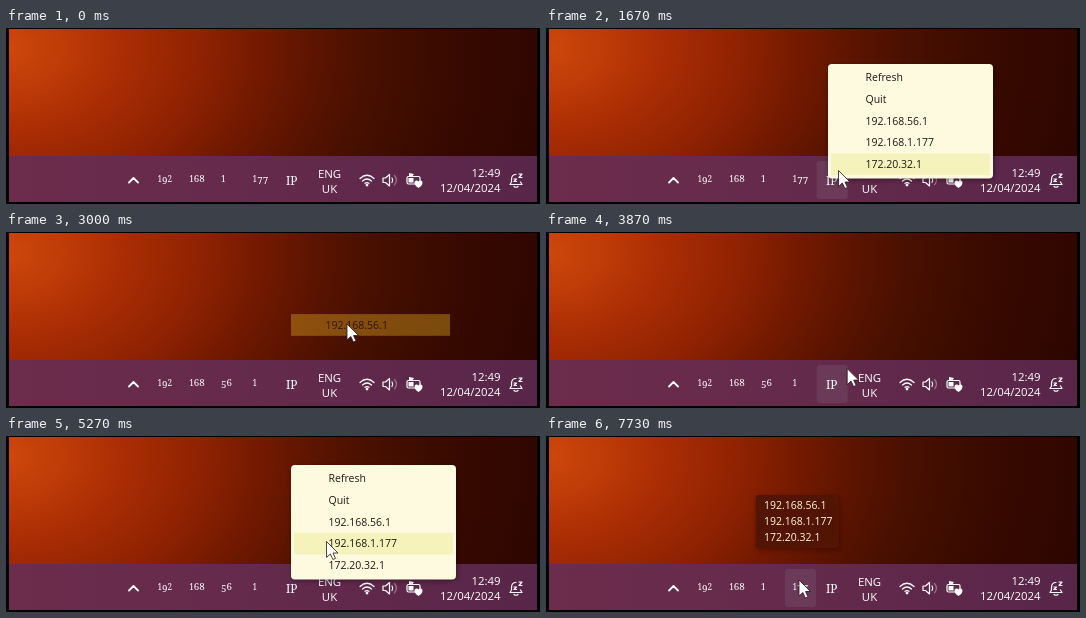
Recreate the animation shown at these times as an HTML page. Size 534 by 176 pixels, loop 8 s.

```html
<!DOCTYPE html>
<html lang="en">
<head>
<meta charset="utf-8">
<title>Tray address menu</title>
<style>
  html, body { margin: 0; width: 100%; height: 100%; overflow: hidden; background: #000; }
  svg { display: block; width: 100%; height: 100%; }
  text { font-family: "Open Sans", "Noto Sans", sans-serif; white-space: pre; }
  .clock { font-size: 11.4px; font-weight: 500; fill: #fff; }
  .serif, .serif tspan { font-family: "Noto Serif", "Liberation Serif", serif; fill: #fff; }
  .item { font-size: 10.5px; fill: #1c1a14; }
  .tip { font-size: 10.5px; font-weight: 500; fill: #fff8dc; }
  .line { fill: none; stroke: #fff; stroke-width: 1.2; stroke-linecap: round; stroke-linejoin: round; }
</style>
</head>
<body>
<svg viewBox="0 0 534 176">
  <defs>
    <radialGradient id="glow" gradientUnits="userSpaceOnUse" cx="0" cy="0" r="560"
      gradientTransform="translate(0 20) scale(1 .72)">
      <stop offset="0" stop-color="#cc480c"/>
      <stop offset=".1" stop-color="#c03c08"/>
      <stop offset=".2" stop-color="#ac2e04"/>
      <stop offset=".35" stop-color="#8e2202"/>
      <stop offset=".45" stop-color="#741a00"/>
      <stop offset=".55" stop-color="#5c1400"/>
      <stop offset=".65" stop-color="#481000"/>
      <stop offset=".8" stop-color="#380a00"/>
      <stop offset="1" stop-color="#2c0500"/>
    </radialGradient>
    <linearGradient id="bar">
      <stop offset="0" stop-color="#6c2c4c"/>
      <stop offset=".5" stop-color="#642a4c"/>
      <stop offset="1" stop-color="#582649"/>
    </linearGradient>
    <filter id="soft" x="-20%" y="-20%" width="140%" height="140%">
      <feGaussianBlur stdDeviation="2.5"/>
    </filter>
  </defs>

  <rect width="534" height="176"/>
  <rect x="3" y="1" width="528" height="128" fill="url(#glow)"/>
  <rect x="3" y="128" width="528" height="46" fill="url(#bar)"/>

  <rect id="slot" y="133" width="31" height="38" rx="3" fill="#6a3a58"/>
  <path class="line" style="stroke-width:1.8" d="M123 154.5l4.5-4.5 4.5 4.5"/>
  <g id="digits"></g>
  <text class="serif" x="280" y="156.500" font-size="11.8">IP</text>
  <text class="clock" x="323.500" y="150" text-anchor="middle">ENG</text>
  <text class="clock" x="323.500" y="165" text-anchor="middle">UK</text>

  <path class="line" d="M354 150.500q7-6.500 14 0M356.500 153q4.500-4 9 0M359 155.300q2-1.600 4 0"/>
  <circle cx="361" cy="157" r="1.400" fill="#fff"/>
  <path class="line" d="M377 150h2.500l4-3.500v11.500l-4-3.500H377z"/>
  <path class="line" d="M386 150q1.600 2.200 0 4.500"/>
  <path class="line" style="stroke:#a0708c" d="M388.500 147.500q4 4.700 0 9.300"/>
  <rect class="line" x="401" y="148.500" width="13" height="7.500" rx="1.500"/>
  <path fill="#fff" d="M402.500 150h5v4.500h-5zM403 145l5 1-2 3h-3zM408.500 154.500q0-2 2-2 1.500 0 2 1 .5-1 2-1 2 0 2 2 0 3-4 5.500-4-2.500-4-5.500z"/>
  <text class="clock" x="494.500" y="148.500" text-anchor="end">12:49</text>
  <text class="clock" x="494.500" y="164" text-anchor="end">12/04/2024</text>
  <path class="line" d="M510 146.500q-4.500 0-4.500 5v2.500l-1.500 2.500h12l-1.500-2.500M508 158.500q2 1.500 4 0M513 146h3l-3 3.500h3M508 151h2.500l-2.500 2.500h2.500"/>

  <g id="tooltip">
    <rect x="210" y="61" width="84" height="53" rx="3" fill="#200600" opacity=".4" filter="url(#soft)"/>
    <rect x="210" y="59" width="83" height="53" rx="3" fill="#521504"/>
  </g>
  <g id="menu">
    <rect x="1" y="2" width="165" height="114" rx="5" opacity=".4" filter="url(#soft)"/>
    <rect width="165" height="114.500" rx="4" fill="#fdfae0"/>
    <rect id="hover" x="3" width="159" height="21.700" fill="#f6f2bb"/>
  </g>
  <g id="picked">
    <rect width="159" height="21.700" fill="#d8a420" opacity=".82"/>
    <text class="item" x="34.500" y="14.600"></text>
  </g>
  <path id="cursor" d="M0 0V16L3.800 12.500 6.400 18 9 16.900 6.500 11.500H11.500Z" fill="#fff" stroke="#2a1414" stroke-width=".8"/>
</svg>
<script>
const el = id => document.getElementById(id);
const LOOP = 8000, TICK = 1000 / 15, ROW = 21.7, PAD = 2.7;
const SLOT_X = 239, SLOT_W = 31.7;
const ADDRESSES = ['192.168.56.1', '192.168.1.177', '172.20.32.1'];
const ITEMS = ['Refresh', 'Quit', ...ADDRESSES];

// Times below are in ticks of 1/15 second.
const PATH = [
  [7, 308, -20], [10, 304, 28], [13, 286, 95], [16, 277, 146], [18, 287, 161], [20, 282, 151],
  [23, 282, 151], [27, 303, 134], [32, 335, 102], [33, 336, 100], [36, 340, 94],
  [38, 340, 94], [40, 341, 92], [49, 341, 92], [50, 341, 93], [51, 341, 93],
  [55, 321, 115], [60, 288, 151], [64, 281, 155], [66, 286, 143],
  [70, 286, 143], [74, 307, 118], [77, 322, 104], [78, 322, 104], [80, 319, 107],
  [93, 319, 107], [97, 290, 126], [102, 256, 143], [103, 252, 145], [105, 252, 145],
  [106, 253, 145], [108, 253, 145], [109, 253, 144], [120, 253, 144]
];
const MENUS = [
  { x: 282, y: 36, open: 21, close: 43, item: 2 },
  { x: 285, y: 29, open: 69, close: 90, item: 3 }
];
const TRAY = [[0, ADDRESSES[1]], [44, ADDRESSES[0]], [91, ADDRESSES[1]]];

const clamp = v => Math.max(0, Math.min(1, v));
const show = (node, opacity) => {
  node.style.display = opacity > 0 ? '' : 'none';
  node.style.opacity = opacity;
};
const move = (node, x, y) => node.setAttribute('transform', `translate(${x} ${y})`);

function addText(parent, cls, x, y, value) {
  const node = document.createElementNS('http://www.w3.org/2000/svg', 'text');
  node.setAttribute('class', cls);
  node.setAttribute('x', x);
  node.setAttribute('y', y);
  node.textContent = value;
  parent.append(node);
  return node;
}

// Old-style figures: 0-2 are short, 6 and 8 rise, the rest descend.
function oldStyle(number) {
  return [...number].map(d => {
    const size = '012'.includes(d) ? 8.2 : 9.8;
    const y = '34579'.includes(d) ? 156 : 154;
    return `<tspan y="${y}" font-size="${size}">${d}</tspan>`;
  }).join('');
}

ITEMS.forEach((label, i) => addText(el('menu'), 'item', 37.5, PAD + ROW * i + 14.6, label));
ADDRESSES.forEach((label, i) => addText(el('tooltip'), 'tip', 218, 73 + 15.8 * i, label));
const digits = [0, 1, 2, 3].map(i => addText(el('digits'), 'serif', 151.5 + SLOT_W * i, 154, ''));
const pickedText = el('picked').querySelector('text');
let trayAddress = '';

function cursorAt(tick) {
  if (tick <= PATH[0][0]) return PATH[0].slice(1);
  const i = PATH.findIndex(p => p[0] >= tick);
  const [t0, x0, y0] = PATH[i - 1], [t1, x1, y1] = PATH[i];
  const k = (tick - t0) / (t1 - t0);
  return [x0 + (x1 - x0) * k, y0 + (y1 - y0) * k];
}

function draw(tick) {
  const [x, y] = cursorAt(tick);
  move(el('cursor'), x, y);

  const slot = Math.floor((x - SLOT_X) / SLOT_W);
  const onSlot = y > 133 && y < 171 && (slot === 0 || slot === 1);
  show(el('slot'), onSlot ? 1 : 0);
  el('slot').setAttribute('x', SLOT_X + SLOT_W * slot);

  const address = TRAY.filter(([t]) => t <= tick).pop()[1];
  if (address !== trayAddress) {
    trayAddress = address;
    address.split('.').forEach((part, i) => { digits[i].innerHTML = oldStyle(part); });
  }

  const menu = MENUS.find(m => tick >= m.open && tick < m.close);
  show(el('menu'), menu ? clamp(0.5 + (tick - menu.open) * 0.3) : 0);
  if (menu) {
    move(el('menu'), menu.x, menu.y);
    const row = Math.floor((y - menu.y - PAD) / ROW);
    show(el('hover'), row >= 0 && row < ITEMS.length && x > menu.x + 3 ? 1 : 0);
    el('hover').setAttribute('y', PAD + ROW * row);
  }

  const chosen = MENUS.find(m => tick >= m.close && tick < m.close + 4);
  show(el('picked'), chosen ? 0.95 - (tick - chosen.close) * 0.22 : 0);
  if (chosen) {
    move(el('picked'), chosen.x + 3, chosen.y + PAD + ROW * chosen.item);
    pickedText.textContent = ITEMS[chosen.item];
  }

  show(el('tooltip'), clamp((tick - 112) / 4));
}

const start = performance.now();
function frame() {
  const time = (performance.now() - start) % LOOP;
  draw(Math.min(119, Math.floor((time + 4) / TICK)));
  requestAnimationFrame(frame);
}
frame();
</script>
</body>
</html>
```
